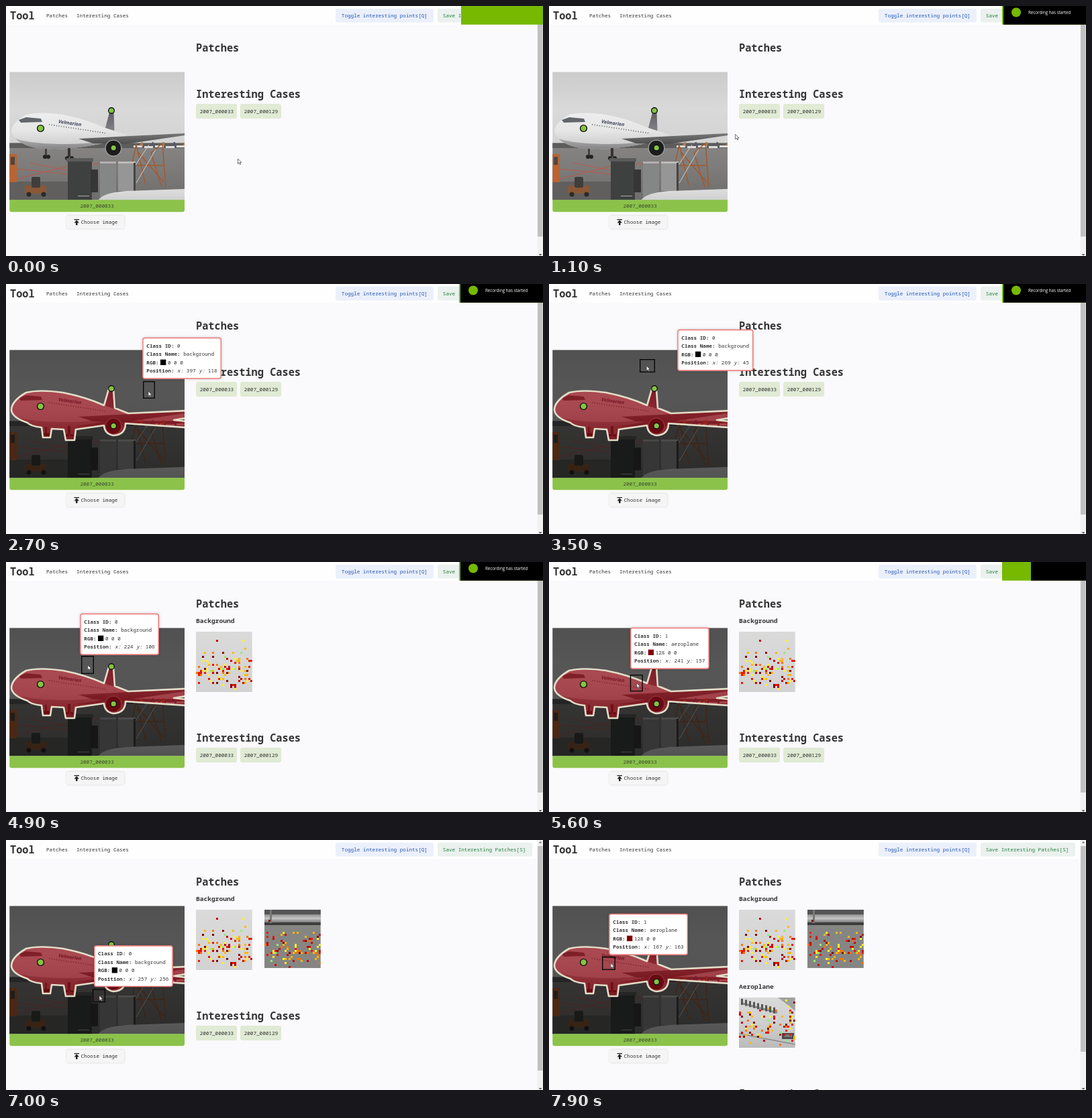
An HTML page with a canvas that plays this animation: 800 by 373 pixels, repeating every 8 s.

```html
<!DOCTYPE html>
<html lang="en">
<head>
<meta charset="utf-8">
<title>Patch tool</title>
<style>
html, body { margin: 0; width: 100%; height: 100%; overflow: hidden; background: #faf9fa; }
canvas { display: block; }
</style>
</head>
<body>
<canvas id="stage" width="800" height="373"></canvas>
<script>
const ctx = document.getElementById('stage').getContext('2d');
const MONO = '"Noto Sans Mono", "DejaVu Sans Mono", monospace';
const LOOP = 8000, STEP = 100, SMALL = 7.63, BIG = 15.3;
const CHAR = SMALL * 0.6;

// time, cursor x y, selection x y w h, tooltip x y
const track = [
  [0, 346, 228, 336, 218, 20, 20, 336, 153],
  [400, 346, 228, 336, 218, 20, 20, 336, 153],
  [1700, 220, 160, 209, 149, 20, 20, 212, 85],
  [2000, 217, 158, 206, 147, 20, 20, 207, 82],
  [2700, 212.5, 160, 204, 145, 18, 26, 204, 80],
  [3500, 145.7, 122, 135, 112, 23, 20, 192, 68],
  [4100, 128, 146, 118, 133, 19, 27, 120, 71],
  [4900, 122.3, 153.8, 112, 140, 19, 27, 111, 77],
  [5400, 124, 160, 114, 147, 19, 27, 113, 84],
  [6200, 152, 242, 141, 231, 19, 20, 148, 140],
  [6800, 150, 243, 140, 233, 19, 20, 141, 168],
  [7900, 92.4, 183.5, 79, 174, 20, 20, 90, 110]
];

const shape = {
  body: new Path2D('M8 187Q9 174 30 162Q50 157 85 162Q120 169 148 182L180 192Q160 205 100 212Q60 217 34 209Q10 200 8 187Z'),
  belly: new Path2D('M14 198Q40 206 90 206T176 194Q160 205 100 212Q60 217 34 209Q20 204 14 198Z'),
  fin: new Path2D('M148 182L154.5 157H160.5L161.5 187Z'),
  wing: new Path2D('M108 198L165 195 266 190V193L178 206 130 205Z'),
  mask: new Path2D('M8 187Q9 174 30 162Q50 157 85 162Q120 169 146 181L153 157H160L162 185 182 193 268 189V200L250 203 268 205V214L178 208Q178 225 160 226Q147 224 146 211L104 217 102 233H89L86 217 68 216 66 229H55L53 214Q36 212 32 207Q8 199 8 187Z'),
  arrow: new Path2D('M0 0V7.4L1.8 5.8 3 8.4 4.2 7.9 3.1 5.4H5.3Z')
};

const clamp = v => Math.max(0, Math.min(1, v));
const ramp = (t, from, to) => clamp((t - from) / (to - from));

function pose(t) {
  const i = track.findIndex(k => k[0] > t);
  if (i < 0) return track[track.length - 1];
  const a = track[i - 1], b = track[i], p = ramp(t, a[0], b[0]);
  return a.map((v, j) => v + (b[j] - v) * p);
}

function rect(x, y, w, h, color, r = 0) {
  ctx.fillStyle = color;
  ctx.beginPath();
  ctx.roundRect(x, y, w, h, r);
  ctx.fill();
}

function text(s, x, midY, { size = SMALL, color = '#333', style = '', family = MONO } = {}) {
  ctx.font = `${style} ${size}px ${family}`;
  ctx.fillStyle = color;
  ctx.fillText(s, x, midY + size * 0.36);
}

function disc(x, y, r, color) {
  ctx.fillStyle = color;
  ctx.beginPath();
  ctx.arc(x, y, r, 0, 7);
  ctx.fill();
}

function lines(color, width, ...paths) {
  ctx.strokeStyle = color;
  ctx.lineWidth = width;
  for (const d of paths) ctx.stroke(new Path2D(d));
}

function fill(path, color) {
  ctx.fillStyle = color;
  ctx.fill(path);
}

function fade(y0, y1, ...colors) {
  const g = ctx.createLinearGradient(0, y0, 0, y1);
  colors.forEach((c, i) => g.addColorStop(i / (colors.length - 1), c));
  return g;
}

function ground() {
  rect(5, 98, 262, 110, fade(98, 208, '#cbcbcb', '#d9d9d9', '#d3d3d3'));
  rect(5, 204, 262, 86, fade(204, 290, '#868583', '#7c7a78', '#6e6d6c'));
  rect(5, 205, 262, 7, '#5d5e5c');
  for (let i = 0; i < 5; i++) {
    rect(190 + i * 16, 208 + i % 2, 13, 3, '#dedede');
    fill(new Path2D(`M${199 + i * 16} 208l3-5h2v6z`), i % 2 ? '#5a5870' : '#b77a50');
  }
  rect(5, 262, 88, 28, '#605f5e');
}

function plane() {
  fill(shape.fin, fade(156, 188, '#5f5a62', '#85848a'));
  fill(shape.body, fade(160, 212, '#ededed', '#e6e6e6', '#c9c9ca'));
  fill(shape.belly, fade(196, 214, '#b2b2b3', '#858587'));
  fill(new Path2D('M19 170L30 166 52 168 54 173 22 174Z'), '#63676b');
  for (let i = 0; i < 24; i++) rect(64 + i * 3.6, 176 + i * 0.55, 1.3, 1.8, '#777b82');
  fill(shape.wing, fade(190, 206, '#777', '#4d4d4f'));
  rect(58, 213, 3, 10, '#444');
  rect(92, 212, 4, 13, '#333');
  [[58, 225], [63, 225], [91, 227], [98, 227]].forEach(([x, y]) => disc(x, y, 3, '#222'));
  disc(160, 212, 12.5, '#a5a5a5');
  disc(160, 212, 11.2, '#1d1d1f');
  ctx.save();
  ctx.translate(78, 172);
  ctx.rotate(0.14);
  text('Velmarion', 0, 0, { size: 7.2, color: '#3d4258', style: 'italic bold', family: '"Open Sans", sans-serif' });
  ctx.restore();
}

function foreground() {
  lines('#c85147', 0.8, 'M16 243L92 251', 'M16 258L92 239', 'M35 234L91 245', 'M128 235H178');
  rect(5, 221, 11, 42, '#b96432');
  rect(7, 225, 6, 12, '#4b4845');
  rect(28, 268, 32, 12, '#8a5836', 2);
  rect(38, 255, 13, 16, '#3f3e3c', 2);
  disc(34, 281, 3.5, '#2a2a2a');
  disc(56, 281, 3.5, '#2a2a2a');
  lines('#a05a32', 1.5, 'M181 266L194 207 208 267M187 238H235M232 270L216 219 233 205 238 270M196 217L235 263');
  lines('#d0cdc8', 1, 'M185 249L213 207M194 264L223 214');
  rect(92, 229, 36, 61, '#3f4040');
  rect(90, 227, 40, 5, '#5a5c5b');
  rect(126, 244, 11, 34, '#363636');
  rect(140, 233, 24, 52, '#858786');
  rect(167, 234, 26, 42, '#959695');
  rect(140, 232, 24, 3, '#b0b0b0');
  rect(167, 232, 26, 3, '#bbb');
  rect(190, 234, 3, 42, '#444');
  rect(107, 283, 17, 1, '#aaa');
  fill(new Path2D('M137 290Q145 278 180 276L267 273V290Z'), fade(273, 290, '#dedede', '#cfcfcf'));
}

function photo(masked) {
  ctx.save();
  ctx.beginPath();
  ctx.rect(5.3, 98.5, 260.7, 191);
  ctx.clip();
  ground();
  plane();
  foreground();
  if (masked) {
    const outside = new Path2D(shape.mask);
    outside.rect(0, 90, 280, 210);
    ctx.fillStyle = 'rgba(0,0,0,.6)';
    ctx.fill(outside, 'evenodd');
    fill(shape.mask, 'rgba(140,0,12,.69)');
    ctx.lineJoin = 'round';
    ctx.strokeStyle = '#e3ddc8';
    ctx.lineWidth = 2.6;
    ctx.stroke(shape.mask);
  }
  ctx.restore();
  for (const [x, y, r] of [[51.5, 182.5, 5.6], [157, 156, 5], [160.2, 211.7, 5]]) {
    disc(x, y, r, '#111');
    disc(x, y, r - 1.4, '#85c441');
  }
}

const heat = ['#850000', '#c40000', '#e81800', '#f87400', '#fcb800', '#fff02a', '#8fef70'];

function scatter(seed, count, top, rows) {
  const random = () => (seed = seed * 16807 % 2147483647) / 2147483647;
  return Array.from({ length: count }, () => {
    const spread = random() < 0.06 ? random() * rows : rows * (top + (1 - top) * (random() + random()) / 2);
    return [Math.floor(random() * 28), Math.floor(spread), heat[Math.floor(random() * 6.4)]];
  });
}

const patches = [
  { at: 4200, x: 283, y: 104, h: 90, dots: scatter(4217, 108, 0.25, 30), paint() {
    rect(0, 0, 84, 90, fade(0, 90, '#dadada', '#d2d2d3'));
  } },
  { at: 6700, x: 385, y: 104, h: 87, dots: scatter(9151, 95, 0.32, 29), paint() {
    rect(0, 0, 84, 87, '#858684');
    rect(0, 0, 84, 7, '#555');
    rect(0, 7, 84, 12, fade(7, 19, '#8e8e8e', '#c5c5c5', '#777'));
    rect(0, 19, 84, 4, '#3d3d3d');
    rect(8, 0, 3, 20, '#777');
  } },
  { at: 7500, x: 283, y: 235, h: 75, dots: scatter(2713, 85, 0.08, 25), paint() {
    rect(0, 0, 84, 75, fade(0, 75, '#d9d9d9', '#cfcfcf', '#bbb'));
    for (let i = 0; i < 9; i++) {
      rect(3 + i * 6, 2 + i * 1.6, 3, 9, '#555');
      rect(6 + i * 6, 8 + i * 1.6, 3, 3, '#888');
    }
    fill(new Path2D('M58 0H84V20Z'), '#a2a2a2');
    lines('#8a8a8a', 1.5, 'M0 54L84 70');
    rect(64, 53, 18, 9, '#4b4b4b');
    rect(67, 55, 12, 4, '#777');
  } }
];

function drawPatch(p) {
  ctx.save();
  ctx.translate(p.x, p.y);
  ctx.beginPath();
  ctx.rect(0, 0, 83.7, p.h);
  ctx.clip();
  p.paint();
  for (const [col, row, color] of p.dots) rect(col * 3, row * 3, 3, 3, color);
  ctx.restore();
}

function results(t) {
  const shown = patches.filter(p => t >= p.at);
  const shift = [0, 131, 131, 247][shown.length];
  const title = { size: BIG, style: '600' }, label = { size: 9.58, style: '600' };
  text('Patches', 283, 62, title);
  if (shown.length) text('Background', 283, 88, label);
  if (shown.length > 2) text('Aeroplane', 283, 219, label);
  shown.forEach(drawPatch);
  text('Interesting Cases', 283, 131 + shift, title);
  ['2007_000033', '2007_000129'].forEach((id, i) => {
    rect(283 + i * 66, 146 + shift, 61, 22, '#e0ead4', 3);
    text(id, 288.7 + i * 66, 157 + shift);
  });
  rect(791.5, 0, 8.5, 373, '#f1f1f1');
  rect(792, 9, 7.5, shown.length > 2 ? 307 : 335, '#c1c1c1');
  fill(new Path2D('M793.5 4.5L796 2 798.5 4.5Z'), '#777');
  fill(new Path2D('M793.5 370L796 372.5 798.5 370Z'), '#555');
}

function header() {
  rect(0, 0, 791.5, 28, '#fefefe');
  text('Tool', 6, 14, { size: BIG, style: '600' });
  text('Patches', 60, 14);
  text('Interesting Cases', 105, 14);
  rect(491, 4, 146, 20.5, '#ebf0fb', 3);
  text('Toggle interesting points[Q]', 499.8, 14, { color: '#2455b5' });
  rect(643, 4, 141, 20.5, '#eaf1ee', 3);
  text('Save Interesting Patches[S]', 650.8, 14, { color: '#25803f' });
}

function imageCard(t) {
  photo(t >= 2300);
  rect(5.3, 289.3, 260.7, 18, '#8bc34a', [0, 0, 3, 3]);
  text('2007_000033', 110.4, 298, { color: '#3d4a31' });
  ctx.save();
  ctx.shadowColor = 'rgba(0,0,0,.18)';
  ctx.shadowBlur = 2;
  rect(90, 312.5, 86.5, 20, '#f5f5f5', 3);
  ctx.restore();
  text('Choose image', 111.5, 322.5);
  rect(101.5, 318, 7.5, 1.3, '#222');
  fill(new Path2D('M105.2 319.5L109 323.5H106.5V327H104V323.5H101.5Z'), '#222');
}

function tooltip(x, y, px, py, onPlane) {
  const pos = [px - 5.4, py - 98.6].map(v => Math.round(v / 0.5213));
  const width = `Position: x: ${pos[0]} y: ${pos[1]}`.length * CHAR + 12;
  ctx.save();
  ctx.shadowColor = 'rgba(0,0,0,.22)';
  ctx.shadowBlur = 4;
  rect(x - 0.5, y, width, 61.5, '#fff', 3);
  ctx.restore();
  ctx.strokeStyle = '#ef7474';
  ctx.lineWidth = 1.4;
  ctx.beginPath();
  ctx.roundRect(x, y + 0.5, width - 1, 60.5, 3);
  ctx.stroke();
  const left = x + 5.3;
  const put = (s, col, row, style) => text(s, left + col * CHAR, y + 12.2 + row * 12.45, { style });
  put('Class ID:', 0, 0, '600');
  put(onPlane ? '1' : '0', 10, 0);
  put('Class Name:', 0, 1, '600');
  put(onPlane ? 'aeroplane' : 'background', 12, 1);
  put('RGB:', 0, 2, '600');
  rect(left + 20.7, y + 32.7, 8.3, 8.3, onPlane ? '#800000' : '#000');
  put(onPlane ? '128 0 0' : '0 0 0', 6.9, 2);
  put('Position:', 0, 3, '600');
  put('x:', 10, 3, 'italic');
  put(pos[0], 13, 3);
  const next = 14 + String(pos[0]).length;
  put('y:', next, 3, 'italic');
  put(pos[1], next + 3, 3);
}

function pointer(t) {
  const [, x, y, bx, by, bw, bh, tx, ty] = pose(t);
  if (x < 266) {
    ctx.strokeStyle = '#080808';
    ctx.lineWidth = 1.4;
    ctx.strokeRect(bx + 0.7, by + 0.7, bw - 1.4, bh - 1.4);
    tooltip(tx, ty, x, y, ctx.isPointInPath(shape.mask, x, y));
  }
  ctx.save();
  ctx.translate(x - 0.5, y);
  fill(shape.arrow, '#fff');
  ctx.strokeStyle = '#333';
  ctx.lineWidth = 0.7;
  ctx.stroke(shape.arrow);
  ctx.restore();
}

function notice(t) {
  const leave = ramp(t, 5800, 6100);
  const green = 678 - 3 * ramp(t, 0, 100) + 125 * leave;
  const black = 800 - 123 * (ramp(t, 100, 500) - ramp(t, 5500, 5800));
  rect(green, 0, 800 - green, 27.7, '#76b900');
  rect(black, 0, 800 - black, 27.7, '#000');
  ctx.globalAlpha = ramp(t, 500, 1100) * (1 - ramp(t, 5400, 5600));
  disc(696, 9.5, 7, '#76b900');
  text('Recording has started', 714, 9.8, { size: 6.24, color: '#fff', family: '"Open Sans", sans-serif' });
  ctx.globalAlpha = 1;
}

function draw(now) {
  const t = Math.floor(now % LOOP / STEP) * STEP;
  rect(0, 0, 800, 373, '#faf9fb');
  results(t);
  header();
  imageCard(t);
  pointer(t);
  notice(t);
}

const start = performance.now();
function tick() {
  draw(performance.now() - start);
  requestAnimationFrame(tick);
}
tick();
</script>
</body>
</html>
```
